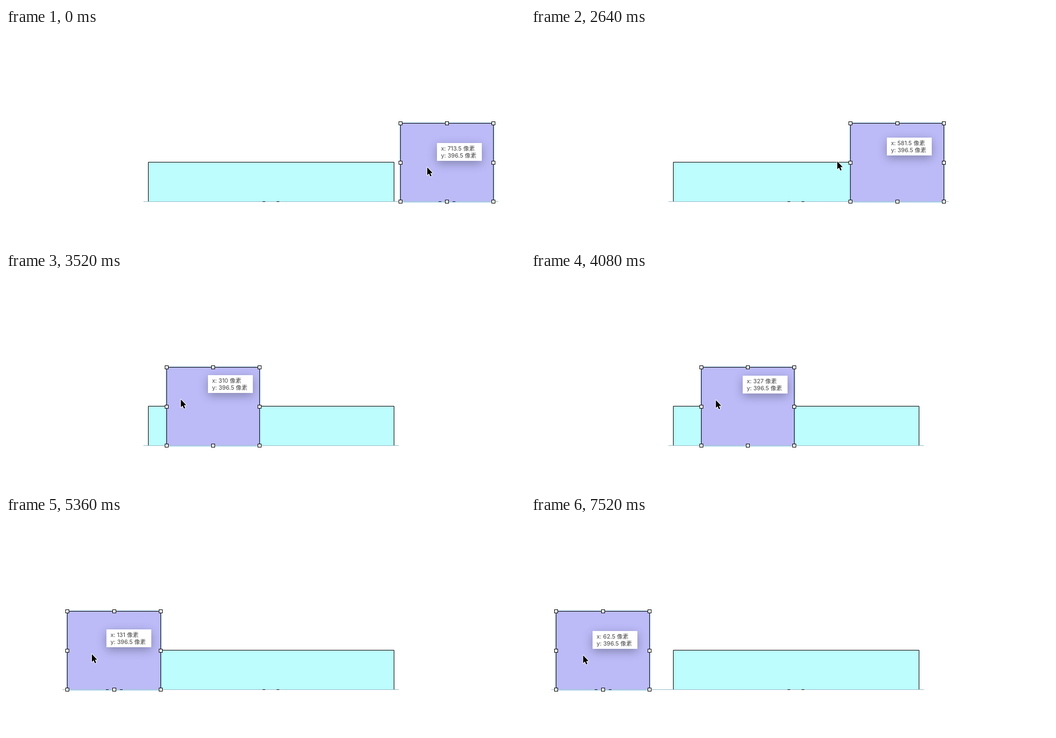
An HTML page with a canvas for the animation above (7600 ms loop, 961 px wide and 400 px high).

```html
<!DOCTYPE html>
<html lang="zh">
<head>
<meta charset="utf-8">
<title>Dragging a square</title>
<style>
  html, body { margin: 0; width: 100%; height: 100%; overflow: hidden; background: #fff; }
  canvas { display: block; }
</style>
</head>
<body>
<canvas id="stage" width="961" height="400"></canvas>
<script>
const ctx = document.getElementById('stage').getContext('2d');
const LOOP = 7600, STEP = 80;
const BAR = { left: 263.5, top: 248.5, right: 718.5 };
const TOP = 176.5, BOTTOM = 321.5, SIDE = 172.5;

// Key points of the drag: [time, left edge of the box]
const drag = [
  [880, 730], [1440, 718.5], [1520, 713.9], [2400, 659], [2560, 591.5], [2640, 591.5],
  [2900, 262], [3200, 536], [3440, 306.4], [3520, 297], [3760, 230], [4000, 324],
  [4560, 163.6], [4640, 163.5], [4720, 155], [5600, 99.5], [6160, 66.5], [7440, 46.5]
];

const snap = v => Math.floor(v) + 0.5;

function slope(i) {
  if (i < 0 || i >= drag.length - 1) return 0;
  return (drag[i + 1][1] - drag[i][1]) / (drag[i + 1][0] - drag[i][0]);
}

function tangent(i) {
  const p = slope(i - 1), q = slope(i);
  return p * q <= 0 ? 0 : 2 * p * q / (p + q);
}

// Monotone cubic through the key points, at rest before and after
function boxLeft(t) {
  const last = drag.length - 1;
  if (t <= drag[0][0]) return drag[0][1];
  if (t >= drag[last][0]) return drag[last][1];
  const i = drag.findIndex(key => key[0] > t) - 1;
  const [t0, a] = drag[i], [t1, b] = drag[i + 1];
  const d = t1 - t0, u = (t - t0) / d, v = 1 - u;
  return v * v * (1 + 2 * u) * a + u * u * (3 - 2 * u) * b
    + d * u * v * (v * tangent(i) - u * tangent(i + 1));
}

// The hand rises and sinks once, in the middle of the loop
function handY(t) {
  const d = Math.min(1, Math.abs(t - 3700) / 2100);
  return 257.5 - 22.5 * Math.cos(d * Math.PI / 2) ** 2;
}

function polyline(points, color) {
  ctx.beginPath();
  points.forEach(([x, y]) => ctx.lineTo(x, y));
  ctx.strokeStyle = color;
  ctx.lineWidth = 1;
  ctx.stroke();
}

function panel(left, top, right, fill) {
  ctx.fillStyle = fill;
  ctx.fillRect(left, top, right - left, BOTTOM - top);
  polyline([[left, BOTTOM], [left, top], [right, top], [right, BOTTOM]], '#000');
}

function halo(left, right) {
  ctx.strokeStyle = 'rgba(165,210,245,0.55)';
  ctx.lineWidth = 5;
  ctx.strokeRect(left, TOP, right - left, BOTTOM - TOP);
}

function ticks(center) {
  ctx.fillStyle = '#000';
  for (const dx of [-13, 13]) ctx.fillRect(Math.round(center + dx - 2.5), 321, 5, 1);
}

function handles(left, right) {
  const midX = snap((left + right) / 2), midY = snap((TOP + BOTTOM) / 2);
  ctx.lineWidth = 1;
  ctx.strokeStyle = '#000';
  ctx.fillStyle = '#fff';
  for (const x of [left, midX, right]) {
    for (const y of [TOP, midY, BOTTOM]) {
      if (x === midX && y === midY) continue;
      ctx.fillRect(x - 3, y - 3, 6, 6);
      ctx.strokeRect(x - 3, y - 3, 6, 6);
    }
  }
}

function readout(x, y, value) {
  ctx.save();
  ctx.shadowColor = 'rgba(0,0,0,0.3)';
  ctx.shadowBlur = 18;
  ctx.shadowOffsetY = 5;
  ctx.fillStyle = '#fff';
  ctx.fillRect(x, y, 83, 33);
  ctx.restore();
  ctx.fillStyle = '#444';
  ctx.font = '10.75px Inter, "Noto Sans CJK SC", "Noto Sans CJK", sans-serif';
  ctx.fillText(`x: ${value} 像素`, x + 7.5, y + 14);
  ctx.fillText('y: 396.5 像素', x + 7.5, y + 27);
}

function pointer(x, y) {
  ctx.save();
  ctx.translate(x, y);
  ctx.beginPath();
  [[0.5, 0.5], [0.5, 15], [3.8, 12], [6.2, 17.5], [8.5, 16.5], [6.2, 11.2], [10.5, 11]]
    .forEach(([px, py]) => ctx.lineTo(px, py));
  ctx.closePath();
  ctx.lineJoin = 'round';
  ctx.lineWidth = 2;
  ctx.strokeStyle = '#fff';
  ctx.stroke();
  ctx.fillStyle = '#000';
  ctx.fill();
  ctx.restore();
}

function draw(t) {
  const at = boxLeft(t);
  const left = snap(at), right = snap(at + SIDE), center = (left + right) / 2;
  ctx.fillStyle = '#fff';
  ctx.fillRect(0, 0, 961, 400);

  panel(BAR.left, BAR.top, BAR.right, '#bdfdfd');
  halo(left, right);
  panel(left, TOP, right, '#bcbbf8');
  polyline([[Math.min(left, BAR.left) - 9, BOTTOM], [Math.max(right, BAR.right) + 9, BOTTOM]], '#98bccb');
  if (left > 510 || right < 465) ticks(490.5);
  if (center < BAR.left || center > BAR.right) ticks(center);
  handles(left, right);

  // The readout trails the box by one step, the pointer leads it by one
  const read = boxLeft(t - STEP);
  const value = 62.5 + (read - 46.5) * 0.9525;
  readout(Math.round(read + 67.5), Math.round(handY(t - STEP) - 44.5), Math.round(value * 2) / 2);
  pointer(boxLeft(t + STEP) + 49.5, handY(t));
}

function tick() {
  const t = performance.now() % LOOP;
  draw(Math.floor(t / STEP) * STEP);
  requestAnimationFrame(tick);
}
tick();
</script>
</body>
</html>
```
